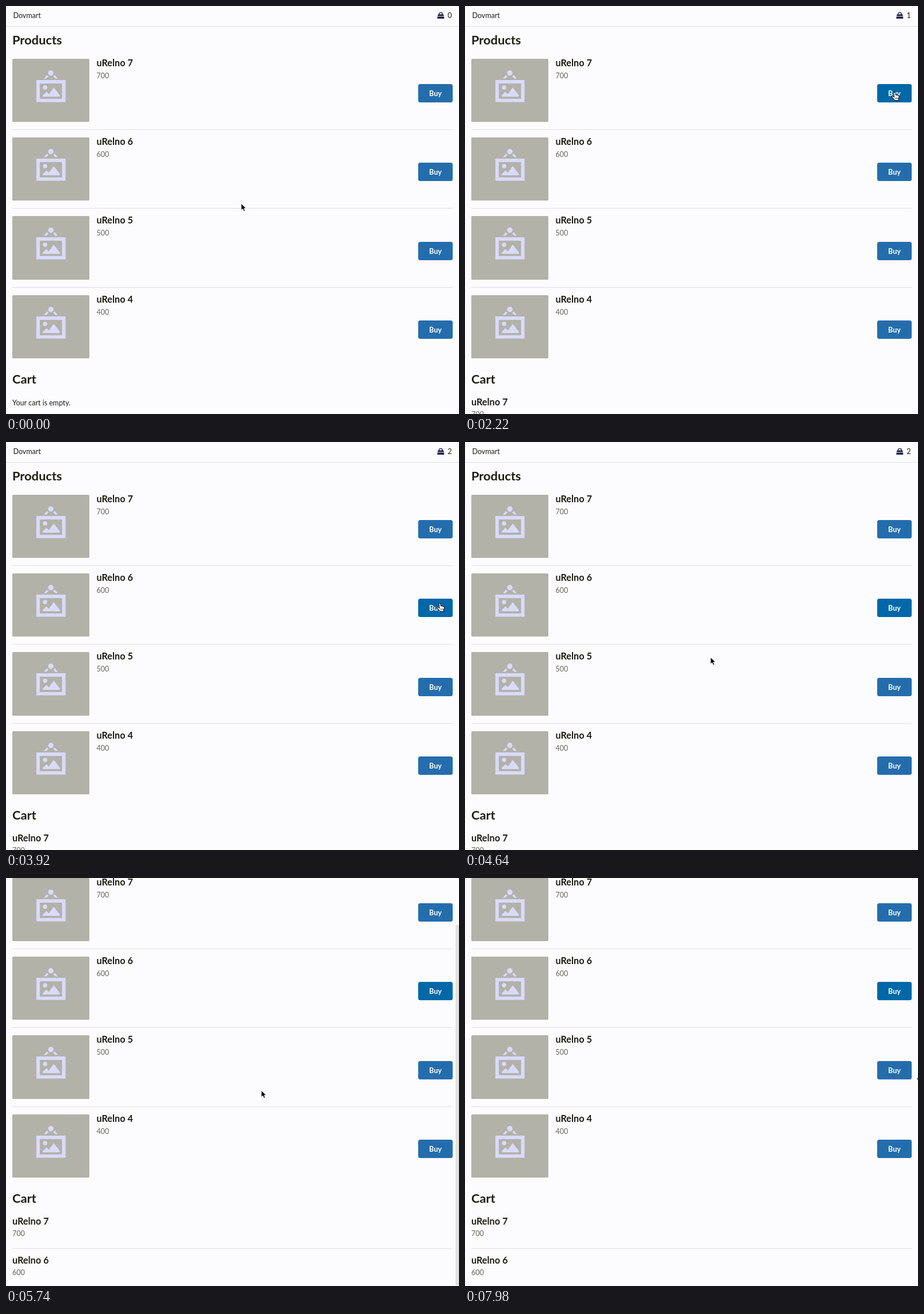
Write an HTML page that moves like this. It is 788 by 711 pixels and loops after 8 s.

```html
<!DOCTYPE html>
<html lang="en">
<head>
<meta charset="utf-8">
<title>Shop cart</title>
<style>
  html, body { margin: 0; width: 100%; height: 100%; overflow: hidden; background: #fcfcff; }
  svg { display: block; width: 788px; height: 711px; font: 12.5px Lato, sans-serif; fill: #1d1d10; }
  .title { font-size: 21.75px; font-weight: 700; }
  .name { font-size: 16.2px; font-weight: 700; }
  .price { fill: #66665a; }
  .buy { font-weight: 700; fill: #fff; text-anchor: middle; }
  .line { fill: #dcdcf4; }
</style>
</head>
<body>
<svg viewBox="0 0 788 711">
  <defs>
    <g id="icon" fill="#dadaff">
      <circle cx="67" cy="25.2" r="4.7"/>
      <path d="M60 28.6 63 31.2 59 34.8H55ZM74 28.6 71 31.2 75 34.8H79Z"/>
      <path fill-rule="evenodd" d="M41.8 37.3H92.5V76H41.8ZM47.8 43.4V70.2H86.5V43.4Z"/>
      <circle cx="57" cy="50.4" r="3.7"/>
      <path d="M53 66.4V64.2L59.4 58 63.6 62 72 50.4 82.6 64V66.4Z"/>
    </g>
  </defs>
  <g id="page">
    <text x="12.5" y="21">Dovmart</text>
    <g fill="#1c1c48">
      <path d="M753.5 15V13.8a2.8 2.4 0 0 1 5.6 0V15" fill="none" stroke="#1c1c48" stroke-width="1.3"/>
      <path d="M751.5 14.6H761L761.8 17.4H750.7ZM750.5 18.6H762L762.3 22H750.2Z"/>
    </g>
    <text id="count" x="768.3" y="21"></text>
    <rect class="line" y="35" width="788" height="1"/>
    <text class="title" x="11" y="67">Products</text>
    <g id="products"></g>
    <text class="title" x="11" y="658">Cart</text>
    <text id="empty" x="11" y="695.5">Your cart is empty.</text>
    <g id="cart"></g>
  </g>
  <rect id="bar" x="782" width="6" height="629" rx="3" fill="#6c6e58"/>
  <g id="arrow">
    <path d="M0 0V12.2L2.8 9.6 4.8 14 7 13 5.1 8.8H9Z" fill="#080808" stroke="#fff" stroke-width="1" stroke-linejoin="round"/>
  </g>
  <g id="hand">
    <path d="M-1.4 .8Q0-1 1.4 .8L2.1 5Q3.5 4 4.4 5.4 6 4.8 6.6 6.2 8.4 5.8 8.3 8L7.2 12V14.5H.5L-1.8 11.5-4.8 8.2Q-4.8 6.3-3 7L-.4 8.6Z" fill="#fff" stroke="#111" stroke-width="1.1" stroke-linejoin="round"/>
    <path d="M2 9.5V12M4 9.5V12M6 9.5V12" stroke="#111" stroke-width=".8"/>
  </g>
  <path id="resize" d="M0 0 5-4.5V-1.2H12V1.2H5V4.5Z" fill="#111" stroke="#fff" stroke-width="1"/>
</svg>
<script>
const LOOP = 8000, MAX_SCROLL = 92, PITCH = 137.3;
const BLUE = '#246dad', ACTIVE_BLUE = '#0068a8';
const CLICKS = [2050, 3700];
const HOVERS = [[1080, 2745], [3003, 4025]];
// Cursor stops: arrival and departure times, then position
const STOPS = [
  [0, 300, 409, 344],
  [1035, 2650, 747, 150],
  [3070, 3900, 755.5, 280.5],
  [4500, 5300, 427, 375],
  [5700, 7200, 444, 370],
  [7900, 8000, 785.5, 350]
];
const $ = id => document.getElementById(id);
const products = [7, 6, 5, 4].map(n => ({ name: `uRelno ${n}`, price: n * 100 }));

const label = ({ name, price }, x, y) =>
  `<text class="name" x="${x}" y="${y}">${name}</text>
   <text class="price" x="${x}" y="${y + 20.7}">${price}</text>`;
const divider = y => `<rect class="line" x="11" y="${y}" width="766" height="1"/>`;

$('products').innerHTML = products.map((item, i) => {
  // Edges snap to whole pixels, each on its own
  const at = offset => Math.round(91.6 + i * PITCH + offset);
  const top = at(0), buttonTop = at(44.5);
  return `<rect x="11" y="${top}" width="134" height="${at(110.5) - top}" rx="1.5" fill="#b2b2a8"/>
    <use href="#icon" x="11" y="${top - .4}"/>${label(item, 157.5, at(13))}
    <rect class="button" x="717" y="${buttonTop}" width="60" height="32" rx="3.5"/>
    <text class="buy" x="747" y="${buttonTop + 20.5}">Buy</text>
    ${i < 3 ? divider(at(123.5)) : ''}`;
}).join('');

$('cart').innerHTML = products.slice(0, 2).map((item, i) =>
  `<g class="entry">${i ? divider(737) : ''}${label(item, 11, 695.7 + i * 68)}</g>`).join('');

const buttons = document.querySelectorAll('.button');
const entries = document.querySelectorAll('.entry');
const show = (node, visible) => node.setAttribute('visibility', visible ? 'visible' : 'hidden');
const move = (node, x, y) => node.setAttribute('transform', `translate(${x} ${y})`);
const ramp = (t, from, to) => Math.min(1, Math.max(0, (t - from) / (to - from)));
const ease = (t, from, to) => {
  const p = ramp(t, from, to);
  return p * p * (3 - 2 * p);
};

function cursorAt(t) {
  const next = STOPS.findIndex(([arrive]) => arrive > t);
  if (next < 0) return STOPS[STOPS.length - 1].slice(2);
  const [, leave, x0, y0] = STOPS[next - 1];
  const [arrive, , x1, y1] = STOPS[next];
  const p = ease(t, leave, arrive);
  return [x0 + (x1 - x0) * p, y0 + (y1 - y0) * p];
}

function render(t) {
  const count = CLICKS.filter(click => t >= click).length;
  const hovered = HOVERS.findIndex(([from, to]) => t >= from && t < to);
  $('count').textContent = count;
  show($('empty'), count === 0);
  entries.forEach((entry, i) => show(entry, i < count));
  buttons.forEach((button, i) => {
    const hover = i === hovered && t > HOVERS[i][0] + 90;
    button.setAttribute('fill', hover || i === count - 1 ? ACTIVE_BLUE : BLUE);
  });

  const scroll = Math.round(MAX_SCROLL * ease(t, 4776, 4920));
  move($('page'), 0, -scroll);
  $('bar').setAttribute('y', scroll * 711 / 803);
  $('bar').setAttribute('opacity', scroll ? 1 - ramp(t, 5500, 5800) : 0);

  const [x, y] = cursorAt(t);
  const kind = t >= 7880 ? 'resize' : hovered >= 0 ? 'hand' : 'arrow';
  for (const id of ['arrow', 'hand', 'resize']) {
    show($(id), id === kind);
    move($(id), x, y);
  }
}

const start = performance.now();
function frame() {
  render((performance.now() - start) % LOOP);
  requestAnimationFrame(frame);
}
frame();
</script>
</body>
</html>
```
